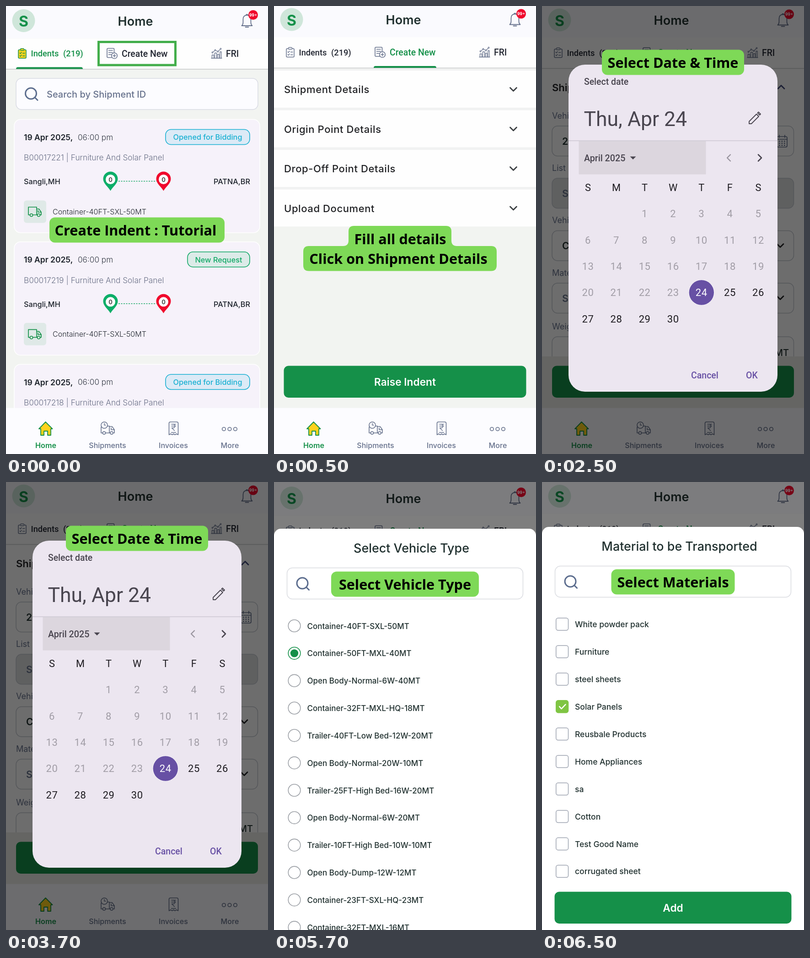
Write an HTML page that moves like this. It is 573x978 px and loops after 8000 ms.

```html
<!DOCTYPE html>
<html lang="en">
<head>
<meta charset="utf-8">
<title>Create indent tutorial</title>
<style>
html, body { margin: 0; width: 100%; height: 100%; overflow: hidden; background: #f2f4f1; }
svg { display: block; width: 100vw; height: 100vh; }
text { white-space: pre; }
</style>
</head>
<body>
<svg id="stage" viewBox="0 0 573 978" preserveAspectRatio="none"></svg>
<script>
const GREEN = '#159049', INK = '#20302f', SLATE = '#66718c', LIME = '#7ed957';
const INTER = 'Inter, sans-serif', ROBOTO = 'Roboto, sans-serif', OPEN = "'Open Sans', sans-serif";

// y is the middle of the capital letters
function text(x, y, str, size, fill = INK, weight = 500, o = {}) {
  const { font = INTER, anchor = 'start', gap = 0 } = o;
  return `<text x="${x}" y="${y + size * 0.362}" font-family="${font}" font-size="${size}" font-weight="${weight}" fill="${fill}" text-anchor="${anchor}" letter-spacing="${gap}">${str}</text>`;
}
const mid = { anchor: 'middle' };
const rob = { font: ROBOTO };
const robMid = { font: ROBOTO, anchor: 'middle' };

function rect(x, y, w, h, fill, r = 0, stroke = 'none', sw = 1) {
  return `<rect x="${x}" y="${y}" width="${w}" height="${h}" rx="${r}" fill="${fill}" stroke="${stroke}" stroke-width="${sw}"/>`;
}
function circle(x, y, r, fill = 'none', stroke = 'none', sw = 1) {
  return `<circle cx="${x}" cy="${y}" r="${r}" fill="${fill}" stroke="${stroke}" stroke-width="${sw}"/>`;
}
function path(d, stroke, sw = 1.5, fill = 'none') {
  return `<path d="${d}" fill="${fill}" stroke="${stroke}" stroke-width="${sw}" stroke-linejoin="round" stroke-linecap="round"/>`;
}
const at = (x, y, s) => `<g transform="translate(${x} ${y})">${s}</g>`;
const rows = (n, fn) => Array.from({ length: n }, (_, i) => fn(i)).join('');

function search(x, y) {
  return at(x, y, circle(-1.5, -1.5, 12, 'none', '#5c6d8e', 3) + path('M7.5 7.5L13 13', '#5c6d8e', 3));
}
function chevron(x, y, dir = 1, color = '#3c4043') {
  return path(`M${x - 7} ${y - 3.5 * dir}L${x} ${y + 3.5 * dir}L${x + 7} ${y - 3.5 * dir}`, color, 2.8);
}
function clipboard(x, y, active) {
  const c = active ? GREEN : SLATE;
  return at(x, y, rect(-8.5, -8, 17, 18.5, active ? '#ffd21c' : 'none', 2, c, 1.5) +
    rect(-4, -10.5, 8, 4, active ? '#ffd21c' : '#fff', 1.5, c, 1.3) +
    path('M-5.5 -1l1.5 1.5l2.5 -3M-5.5 5l1.5 1.5l2.5 -3M1 -.5h4.5M1 5.5h4.5', c, 1.4));
}
function formIcon(x, y) {
  return at(x, y, path('M5.5 -2V-9.5Q5.5 -11 4 -11H-8Q-10 -11 -10 -9V7Q-10 9 -8 9H0M-6.5 -6.5H2M-6.5 -2H2M-6.5 2.5H-1', SLATE, 1.6) +
    circle(6, 5, 6.3, 'none', SLATE, 1.6) + path('M6 2v6M3 5h6', SLATE, 1.5));
}
function chart(x, y) {
  return at(x, y, path('M-11.5 10.5H11.5M-10 10V3.5h4V10M-4 10V-1h4V10M2 10V2h3.5V10M7.5 10V-3.5h3V10', SLATE, 1.3) +
    path('M-9 -2L-3 -7L3 -4L9 -10', SLATE, 1.2) +
    [[-9, -2], [-3, -7], [3, -4], [9, -10]].map(p => circle(p[0], p[1], 1.4, '#fff', SLATE, 1.1)).join(''));
}
function truck(x, y, color) {
  return at(x, y, path('M-11 7H-14V-10H4V7H-4M4 -6H9L14 1V7H12M5 7H4M7 -3V1H13', color, 1.7) +
    circle(-7.5, 7.5, 3, 'none', color, 1.6) + circle(8.5, 7.5, 3, 'none', color, 1.6));
}

function header(dy, active) {
  const y = 30.5 + dy;
  const tab = y + 70.5;
  const on = n => active === n ? GREEN : '#242833';
  let s = rect(0, 0, 573, 68 + dy, '#fafafe') + rect(0, 68 + dy, 573, 67, '#fefefe') +
    rect(0, tab + 33.5, 573, 1.8, '#cfd1d2');
  s += circle(38.5, y - 1, 25, '#cfe6da') + text(38.5, y + .5, 'S', 32, GREEN, 700, mid);
  s += text(283, y, 'Home', 27, INK, 600, mid);
  s += at(527, y, path('M-11.5 10Q-8.5 7.5 -8.5 3V-4Q-8.5 -13 0 -13Q8.5 -13 8.5 -4V3Q8.5 7.5 11.5 10Z', SLATE, 1.8) +
    path('M-2 -13.5Q0 -16 2 -13.5M-3.5 13H3.5', SLATE, 1.8)) +
    circle(540.5, y - 13.5, 10.5, '#f0082c') + text(540.5, y - 13.5, '99+', 8.5, '#fff', 700, mid);
  s += clipboard(35.5, tab, active === 'list') +
    text(54.5, tab, 'Indents', 18.2, on('list'), 500, rob) + text(125, tab, '(219)', 18.2, on('list'), 500, rob);
  s += formIcon(231, tab) + text(253, tab, 'Create New', 19.4, on('new'), 500, rob);
  s += chart(460.5, tab) + text(481, tab, 'FRI', 19.4, '#242833', 500, rob);
  const [x, w] = active === 'list' ? [22, 146] : [218, 137];
  return s + path(`M${x} ${tab + 34}q0 -4 4 -4h${w - 8}q4 0 4 4z`, 'none', 0, GREEN);
}

function nav() {
  let s = rect(0, 877.5, 573, 101, '#fcfcff');
  s += path('M72 923L86.5 908L101.5 923H98V937H91V928H83V937H76V923Z', GREEN, 1.8, '#ffd21c');
  s += at(222, 922, path('M-14 -3V10H-11M-4 10H5M4 10V-5H-3M4 -4H10L15 3V10H13M8 -1V3H14', SLATE, 1.6) +
    circle(-7.5, 10, 3, 'none', SLATE, 1.6) + circle(9, 10, 3, 'none', SLATE, 1.6) +
    circle(-7, -7, 7, '#fcfcff', SLATE, 1.6) + path('M-7 -11V-7H-4', SLATE, 1.4));
  s += at(366.5, 922, path('M-10 14V-11Q-10 -14 -7 -14H7Q10 -14 10 -11V14L6.5 12L3 14L0 12L-3 14L-6.5 12Z', SLATE, 1.6) +
    path('M-4.5 -9H4.5M-4.5 -5H4.5M-4.5 -9H-1Q3 -9 3 -5T-1 -1H-4L2 5M-5 9H5', SLATE, 1.4));
  s += [476.5, 489, 501.5].map(x => circle(x, 923.5, 3.8, 'none', SLATE, 1.6)).join('');
  return s + text(87, 959.5, 'Home', 16.1, GREEN, 600, mid) + text(222, 959.5, 'Shipments', 16.1, SLATE, 500, mid) +
    text(366, 959.5, 'Invoices', 16.1, SLATE, 500, mid) + text(489.5, 959.5, 'More', 16.1, SLATE, 500, mid);
}

const label = (x, y, str) => text(x, y, str, 30.6, '#000', 700, { font: OPEN, anchor: 'middle' });
const banner = (x, y, w, str, textX = x + w / 2) => rect(x, y, w, 55, LIME, 12) + label(textX, y + 28.5, str);
const shade = a => `<rect width="573" height="978" fill="#000" opacity="${a}"/>`;

function pin(x, y, color) {
  return path(`M${x} ${y + 24}C${x - 5} ${y + 15} ${x - 16} ${y + 8} ${x - 16} ${y - 2}A16 16 0 0 1 ${x + 16} ${y - 2}C${x + 16} ${y + 8} ${x + 5} ${y + 15} ${x} ${y + 24}Z`, 'none', 0, color) +
    circle(x, y - 1, 10.5, '#fff') + text(x, y - .5, '0', 13.5, '#222', 500, mid);
}
function card(y, id, isNew) {
  const c = isNew ? '#11a866' : '#19b0d2';
  const w = isNew ? 136 : 184;
  return at(0, y, rect(18, .5, 537, 247.5, '#f6f2fa', 14, '#fff', 1.5) +
    text(39, 39.5, '19 Apr 2025,', 17.5, '#1d232b', 600) + text(157, 39.5, '06:00 pm', 17.2, '#343a45', 300) +
    rect(533 - w, 22.5, w, 33, isNew ? '#dcebe8' : '#dceaf6', 12, c, 1.6) +
    text(533 - w / 2, 39.5, isNew ? 'New Request' : 'Opened for Bidding', 16.3, c, 500, mid) +
    text(39, 84, `${id} | Furniture And Solar Panel`, 17.3, '#6a7087', 300) +
    text(39, 136.5, 'Sangli,MH', 16.3, '#1d232b') + text(534, 136.5, 'PATNA,BR', 16.3, '#1d232b', 500, { anchor: 'end' }) +
    '<path d="M246 135.5H329" stroke="#16a864" stroke-width="1.5" stroke-dasharray="3 2.5"/>' +
    pin(228.5, 132.5, '#0cae68') + pin(344.5, 132.5, '#f0082c') +
    rect(39, 177.5, 49, 49, '#dfe9e7', 6) + truck(63, 202, GREEN) +
    text(102, 202, 'Container-40FT-SXL-50MT', 16.1, '#1d232b', 300));
}

function listScene() {
  return rect(0, 0, 573, 978, '#f2f4f1') + header(2.5, 'list') +
    rect(202.5, 78.5, 168, 50.5, 'none', 0, '#43ae4b', 5) +
    rect(22, 158, 529, 68, '#fcfcff', 12, '#d9dbe4', 1.5) + search(56, 192.5) +
    text(89, 192.5, 'Search by Shipment ID', 20, SLATE, 500) +
    card(247, 'B00017221', false) + card(514.3, 'B00017219', true) + card(781.7, 'B00017218', false) +
    nav() + banner(95, 461.5, 383, 'Create Indent : Tutorial', 283.5);
}

function createScene() {
  const names = ['Shipment Details', 'Origin Point Details', 'Drop-Off Point Details', 'Upload Document'];
  return rect(0, 0, 573, 978, '#f2f4f1') + rect(0, 135, 573, 347, '#f1f2f2') + header(0, 'new') +
    names.map((n, i) => {
      const y = 182 + 86.5 * i;
      return rect(0, y - 41, 573, 81, '#fefefe') + text(22, y + .5, n, 22, '#202124', 500, { gap: .6 }) + chevron(523.5, y);
    }).join('') +
    rect(21.5, 785.5, 530, 69.5, GREEN, 10) + text(286.5, 820.5, 'Raise Indent', 22.7, '#fff', 600, mid) + nav() +
    path('M175 480H376Q388 480 388 492V512Q388 524 400 524H475Q487 524 487 536V566Q487 578.5 475 578.5H76Q64 578.5 64 566V536Q64 524 76 524H151Q163 524 163 512V492Q163 480 175 480Z', 'none', 0, LIME) +
    label(276, 508.5, 'Fill all details') + label(272, 552, 'Click on Shipment Details');
}

function formBehind() {
  const fields = [[239, 'Vehicle', '2'], [353, 'List', 'S'], [467.5, 'Vehicle', 'C'], [582, 'Material', 'S'], [699, 'Weight', '']];
  let s = rect(0, 0, 573, 978, '#f2f4f1') + rect(0, 135, 573, 843, '#fefefe') + header(1, 'new') +
    text(22, 178, 'Shipment', 22, '#202124', 600) + chevron(523, 177, -1, '#40477a');
  s += fields.map(([y, name, v], i) =>
    text(22, y, name, 18, SLATE, 400) + rect(22, y + 23, 528.5, 65.5, i === 1 ? '#dedfdf' : '#fefefe', 12, '#c4c8d0', 1.5) +
    text(44, y + 56, v, 21, i % 2 ? SLATE : INK, 600)).join('');
  s += at(525, 295, rect(-11, -10, 22, 23, 'none', 3, SLATE, 1.7) +
    path('M-11 -4H11M-6 -13V-8M6 -13V-8', SLATE, 1.7) +
    rows(9, i => rect(-7 + 5.5 * (i % 3), -1 + 4.5 * Math.floor(i / 3), 2.8, 2.4, SLATE)));
  s += chevron(521, 523, 1, '#202124') + chevron(521, 637, 1, '#202124') + text(540, 757, 'MT', 20, INK, 500, { anchor: 'end' });
  return s + rect(0, 765, 573, 113, '#eaebe6') + rect(22, 785.5, 529, 69.5, GREEN, 10) + nav();
}

function dateScene() {
  const purple = '#6750a4', grey = '#a19da6', dark = '#1d1b20';
  const colX = i => 100.4 + 62.1 * i;
  let s = formBehind() + shade(.57) + rect(58, 128, 457, 714, '#ece6f0', 36);
  s += text(92, 164.5, 'Select date', 19.4, '#49454f', 500, rob) + text(91.5, 245.5, 'Thu, Apr 24', 44.5, '#49454f', 400, rob) +
    path('M453 257V252L469 236L474 241L458 257ZM471.5 233.5L473.5 231.5L478 236L476 238Z', '#49454f', 1.9) +
    rect(58, 293.5, 457, 1.3, '#c9c4cf') + rect(80.5, 295, 278, 72.5, '#dcd6de') +
    text(92, 332, 'April 2025', 19.7, '#49454f', 500, rob) + path('M192.5 328.5H205.5L199 335Z', 'none', 0, '#49454f') +
    path('M412 324.5L405 331.5L412 338.5', '#99949e', 2.4) + path('M473 324.5L480 331.5L473 338.5', '#49454f', 2.6);
  s += [...'SMTWTFS'].map((d, i) => text(colX(i), 396, d, 21.8, dark, 400, robMid)).join('');
  s += circle(348.8, 625.5, 28, '#fff') + circle(348.8, 625.5, 27.2, purple);
  s += rows(30, i => {
    const day = i + 1, cell = i + 2;
    const color = day < 24 ? grey : day === 24 ? '#fff' : dark;
    return text(colX(cell % 7), 453.5 + 57.3 * Math.floor(cell / 7), day, 22, color, 400, { ...robMid, gap: .6 });
  });
  s += text(326, 806, 'Cancel', 19.5, purple, 500, rob) + text(446, 806, 'OK', 19.5, purple, 500, rob);
  return s + banner(131, 95.5, 311, 'Select Date &amp; Time');
}

function sheet(dy, title) {
  return rect(0, 0, 573, 978, '#f2f4f1') + header(dy, 'new') + shade(.5) +
    at(0, dy, rect(0, 96.5, 573, 920, '#fff', 15) + text(300.5, 139, title, 26.9, INK, 500, mid) +
      rect(28.5, 182, 516, 68, '#fff', 12, '#d9dbe0', 1.5) + search(63.5, 217));
}

function vehicleScene() {
  const names = ['Container-40FT-SXL-50MT', 'Container-50FT-MXL-40MT', 'Open Body-Normal-6W-40MT', 'Container-32FT-MXL-HQ-18MT',
    'Trailer-40FT-Low Bed-12W-20MT', 'Open Body-Normal-20W-10MT', 'Trailer-25FT-High Bed-16W-20MT', 'Open Body-Normal-6W-20MT',
    'Trailer-10FT-High Bed-10W-10MT', 'Open Body-Dump-12W-12MT', 'Container-23FT-SXL-HQ-23MT', 'Container-32FT-MXL-16MT'];
  return sheet(5.5, 'Select Vehicle Type') + names.map((n, i) => {
    const y = 314 + 59.83 * i, on = i === 1;
    return circle(44.5, y, 13.3, '#fff', on ? GREEN : '#9b9fa5', 1.6) + (on ? circle(44.5, y, 8.7, GREEN) : '') +
      text(72.5, y + .5, n, 17, INK);
  }).join('') + banner(125, 195.5, 323, 'Select Vehicle Type');
}

function materialScene() {
  const names = ['White powder pack', 'Furniture', 'steel sheets', 'Solar Panels', 'Reusbale Products',
    'Home Appliances', 'sa', 'Cotton', 'Test Good Name', 'corrugated sheet'];
  return sheet(1.5, 'Material to be Transported') + names.map((n, i) => {
    const y = 310.3 + 59.95 * i, on = i === 3;
    return rect(30.7, y - 13.3, 26.8, 26.8, on ? '#7fc543' : '#fff', 4.5, on ? '#7fc543' : '#9da3b0', 1.5) +
      (on ? path(`M38 ${y}l4.5 5l9 -9.5`, '#fff', 2.4) : '') + text(72, y + .3, n, 17.5, INK);
  }).join('') + rect(27.5, 894.5, 518, 69.5, GREEN, 10) + text(286.5, 930, 'Add', 22.7, '#fff', 600, mid) +
    banner(151.5, 190.5, 270, 'Select Materials');
}

const LOOP = 8000;
const starts = [0, 500, 2500, 4500, 6500];
const stage = document.getElementById('stage');
stage.innerHTML = [listScene, createScene, dateScene, vehicleScene, materialScene]
  .map(make => `<g display="none">${make()}</g>`).join('');
const scenes = [...stage.children];

function draw(ms) {
  const t = ms % LOOP;
  const current = starts.filter(s => s <= t).length - 1;
  scenes.forEach((g, i) => g.setAttribute('display', i === current ? 'inline' : 'none'));
}
const t0 = performance.now();
function tick() {
  draw(performance.now() - t0);
  requestAnimationFrame(tick);
}
draw(0);
requestAnimationFrame(tick);
</script>
</body>
</html>
```
